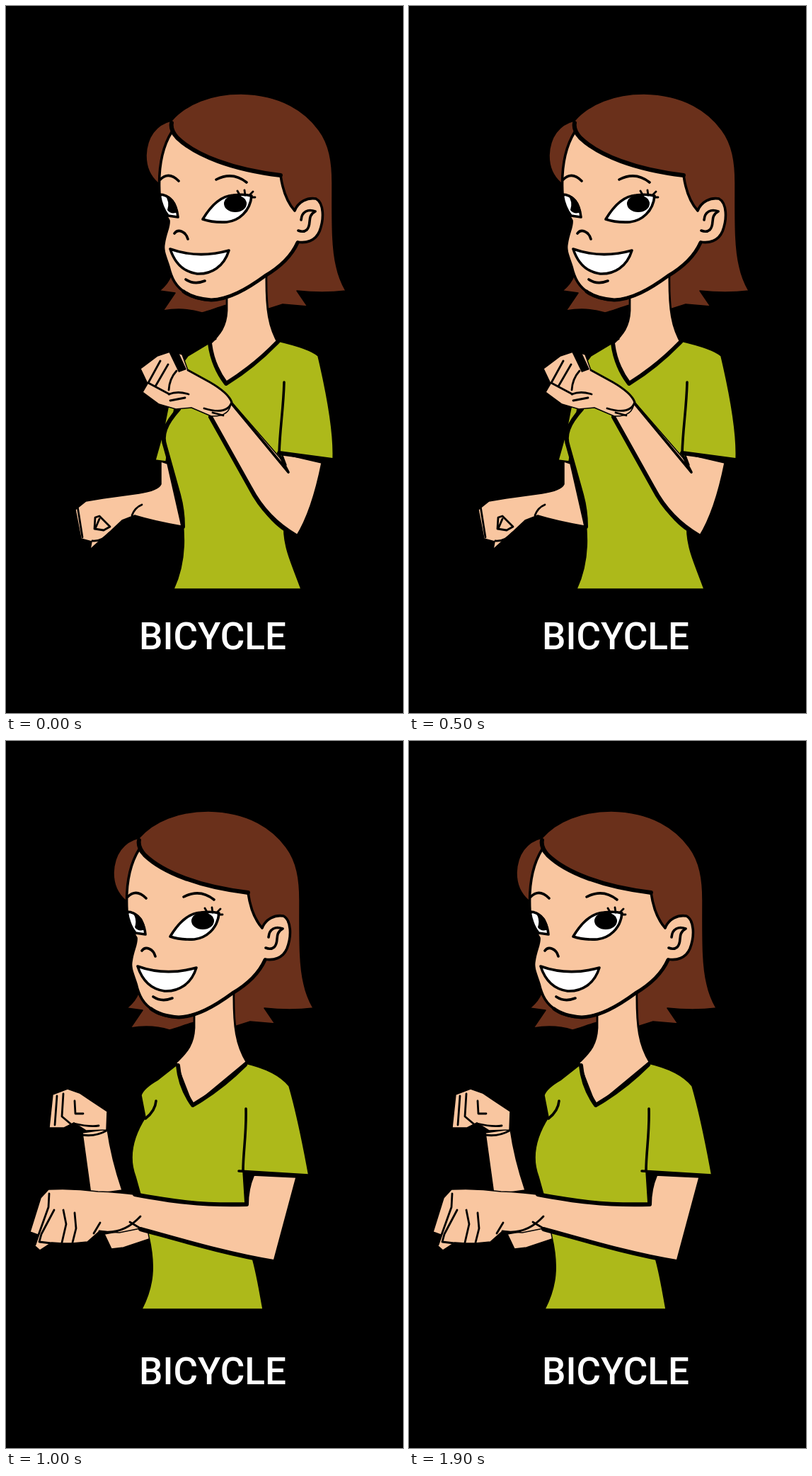
An HTML page that plays this animation: 561x998 px, repeating every 2 s.

```html
<!DOCTYPE html>
<html lang="en">
<head>
<meta charset="utf-8">
<title>Bicycle sign</title>
<style>
  html, body { margin: 0; width: 100%; height: 100%; overflow: hidden; background: #000; }
  svg { display: block; width: 100%; height: 100%; }
  .skin { fill: #f9c6a0; }
  .hair { fill: #6a301b; }
  .shirt { fill: #adb91a; }
  .white { fill: #fff; }
  .ink { fill: #000; }
  .line { fill: none; }
  .edge { stroke-width: 1.5; }
  .thin { stroke-width: 2.8; }
  .bold { stroke-width: 6; }
  .bare { stroke: none; }
  text { font: 500 53px Roboto, sans-serif; fill: #fff; text-anchor: middle; }
</style>
</head>
<body>
<svg viewBox="0 0 561 998">
  <defs>
    <g id="neck">
      <path class="hair edge" d="M234 162 C255 138 290 124 332 124 C390 125 424 150 442 175
        C457 195 461 220 461 250 C461 300 460 340 467 368 C470 382 475 393 480 402
        C455 405 430 404 411 402 L426 424 L391 421 L369 428 L312 422 C298 426 288 430 277 433
        C258 427 240 427 222 430 L239 405 L217 402 C224 396 230 390 233 381 L228 358
        L230 250 L215 250 C203 240 198 226 198 211 C199 185 212 167 234 162Z"/>
      <path class="skin thin" d="M312 400 V430 C311 452 303 463 286 479 L310 541 L386 478
        C372 455 367 430 368 375Z"/>
    </g>
    <g id="face">
      <path class="skin" d="M234 178 C262 210 318 230 388 239 C391 260 398 278 408 289
        C413 276 426 270 438 272 C449 278 450 300 443 318 C437 332 424 335 412 333
        C403 354 388 368 366 381 C340 400 315 414 290 415 C275 415 264 412 254 405
        C240 396 234 385 230 368 C226 355 221 346 223 336 C225 320 231 312 230 303
        C224 293 218 280 217 265 C215 230 221 199 234 178Z"/>
      <path class="line bold" d="M234 165 Q232 175 242 186 C268 211 320 231 388 239"/>
      <path class="line" stroke-width="5" d="M412 334 C403 354 388 368 366 381
        C340 400 315 414 290 415 Q264 413 251 403"/>
      <path class="line" d="M218 245 Q230 233 244 247 M297 245 Q320 233 340 249
        M238 321 C243 314 254 318 257 329 M254 386 Q266 394 281 388
        M417 302 C418 290 427 286 437 290 C424 297 433 308 425 316 Q420 320 413 317"/>
      <path class="white" d="M217 266 C230 266 241 278 243 298 L229 296 Q220 285 217 266Z
        M278 301 C290 281 305 268 321 267 Q337 265 347 268 C345 290 329 303 312 305
        Q292 306 278 301Z"/>
      <path class="white" d="M232 343 C260 353 290 352 315 345 C308 368 290 379 270 378
        Q242 374 232 343Z"/>
      <path class="ink bare" d="M224 266 Q240 270 243 291 Q233 295 228 288 Q232 276 224 266Z"/>
      <ellipse class="ink bare" cx="324" cy="279" rx="16" ry="12"/>
      <path class="line thin" d="M331 268 L327 261 M338 267 L337 260 M344 267 L349 262
        M346 270 L352 270 M219 267 L212 263"/>
    </g>
  </defs>

  <g stroke="#000" stroke-width="3.6" stroke-linejoin="round" stroke-linecap="round">
    <g id="raised">
      <use href="#neck"/>
      <path class="skin edge" d="M219 643 L228 646 L248 734 C225 730 205 726 182 719 L164 726
        L148 741 L130 757 L119 767 L121 756 L106 752 L98 711 L113 699 L137 695 L188 688
        Q215 684 219 675Z"/>
      <path class="line thin" d="M101 706 L108 750 M122 755 Q136 756 146 744
        M126 722 L132 720 L147 735 L138 740 L125 738Z M132 724 L126 738
        M192 704 Q182 708 178 719"/>
      <path class="shirt edge" d="M240 555 L229 567 L222 602 L211 641 L226 643Z"/>
      <path class="shirt edge" d="M297 470 L257 494 L238 520 L246 568 C225 590 219 606 225 622
        L244 690 C253 735 257 780 237 823 H417 C405 790 395 770 393 745 L390 632 L462 641
        C464 600 453 545 441 494 C431 485 410 479 384 473 Q350 509 311 533 Q292 508 288 476Z"/>
      <path class="line bold" d="M288 476 Q292 508 311 533 Q350 509 384 474
        M244 569 C225 590 219 606 225 622 L244 690 Q250 712 250 735"/>
      <path class="line" d="M393 531 C392 570 387 595 386 632"/>
      <path class="skin edge" d="M317 557 L396 648 L390 632 L446 645 C437 690 425 725 410 749
        Q380 738 358 702 L289 579Z"/>
      <path class="line bold" d="M289 580 L345 680 Q368 724 410 748 M386 631 L461 641"/>
      <path class="line" d="M317 559 L399 658 L387 635"/>
      <path class="skin edge" d="M190 512 L214 494 L235 487 L249 492 L257 514 L288 531
        C304 541 314 549 318 559 Q317 580 290 579 L262 567 L240 569 L216 562 L193 545
        L200 533Z"/>
      <path class="line thin" d="M218 501 L201 532 L231 548 M229 506 L211 537
        M241 515 Q231 526 230 542 M230 548 Q243 543 258 548 M232 557 L253 553
        M257 514 L288 531 Q314 546 319 559 Q313 578 280 568 M292 574 L307 578"/>
      <path class="ink bare" d="M230 488 L242 485 L255 513 L244 517Z"/>
      <use href="#face"/>
    </g>

    <g id="lowered">
      <use href="#neck" x="-46" y="-25"/>
      <path class="skin edge" d="M108 553 L143 548 Q149 590 164 634 L120 640Z
        M139 696 L149 717 L166 715 L205 702 L198 686Z"/>
      <path class="skin edge" d="M61 546 L66 499 L87 491 L104 497 L143 523 L142 549
        L113 550 L96 539 L82 546Z"/>
      <path class="line thin" d="M72 501 L69 542 M81 498 L79 530 L92 541
        M97 508 L98 526 L109 526 M96 540 Q118 545 131 543 M107 556 Q126 559 142 550"/>
      <path class="shirt edge" d="M243 456 L215 478 Q194 490 191 500 L197 531
        C181 556 172 586 183 615 L190 640 L202 700 C211 740 209 769 192 802 H363
        C358 775 355 755 349 733 L338 655 L335 608 L428 614 C420 570 411 525 400 487
        Q382 465 338 455 Q304 491 264 514 Q246 489 243 456Z"/>
      <path class="line bold" d="M243 458 Q246 489 264 514 Q304 491 338 457"/>
      <path class="line" d="M212 508 Q211 522 197 533 M339 519 C340 555 335 580 335 607
        M329 607 L427 613"/>
      <path class="skin edge" d="M60 633 Q95 631 130 636 C190 637 235 653 340 655 Q341 632 348 613
        L410 616 L378 735 C315 725 245 704 190 688 L160 694 L132 692 L115 707 L94 709
        L80 709 L65 708 L48 719 L40 712 L45 697 L34 693 L49 645Z"/>
      <path class="line bold" d="M182 640 C230 649 275 656 340 654 Q340 632 348 613
        M190 689 C245 704 315 725 378 735"/>
      <path class="line thin" d="M61 639 L60 658 L46 697 L41 711 M68 662 L50 696 L47 707 L64 709
        M81 662 L85 682 L79 708 M97 666 L99 688 L94 708 M133 680 L124 695
        M132 692 Q165 698 190 671 M175 679 L190 688"/>
      <use href="#face" x="-46" y="-25"/>
    </g>
  </g>
  <text x="292" y="908">BICYCLE</text>
</svg>
<script>
  const LOOP = 2000;
  const raised = document.getElementById("raised");
  const lowered = document.getElementById("lowered");
  const start = performance.now();

  function draw() {
    const isRaised = (performance.now() - start) % LOOP < LOOP / 2;
    raised.style.display = isRaised ? "" : "none";
    lowered.style.display = isRaised ? "none" : "";
    requestAnimationFrame(draw);
  }
  draw();
</script>
</body>
</html>
```
